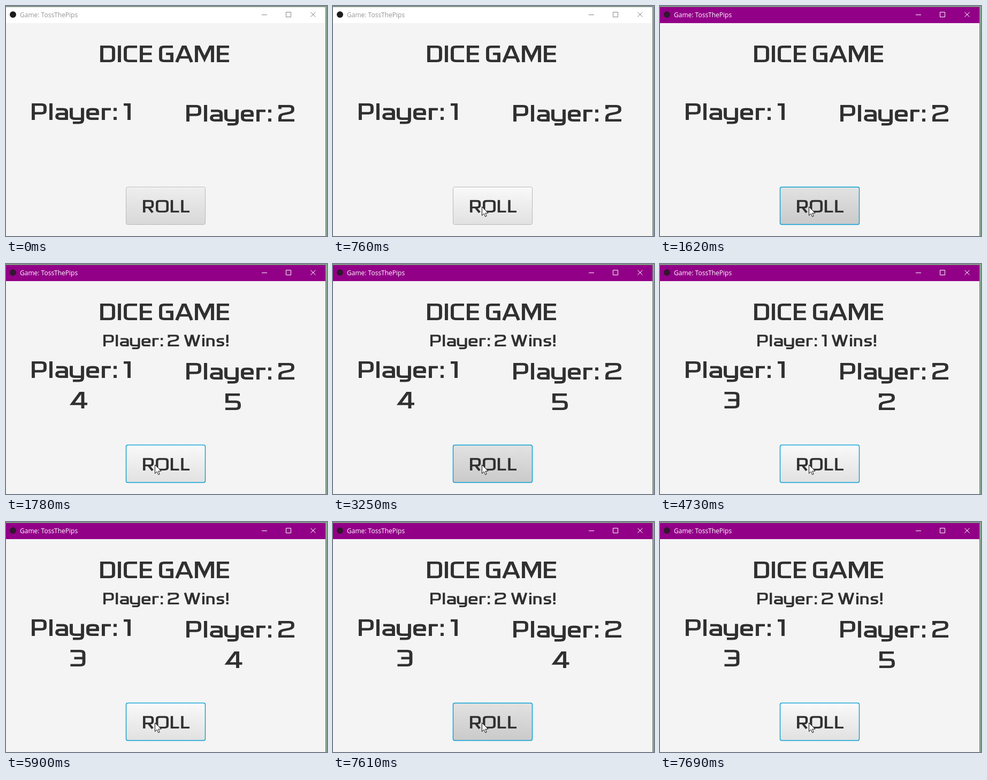
These frames come from a looping animation (600 px wide and 430 px high, 8 s). An HTML page:

```html
<!DOCTYPE html>
<html lang="en">
<head>
<meta charset="utf-8">
<title>Dice game</title>
<style>
html, body { margin: 0; width: 100%; height: 100%; overflow: hidden; background: #f4f4f4; }
svg { display: block; width: 600px; height: 430px; }
.letters path { fill: none; stroke: #303030; stroke-width: 4.5; }
.letters text { font: 34px "DejaVu Sans", sans-serif; fill: transparent; }
#title { font: 12px "Open Sans", sans-serif; }
</style>
</head>
<body>
<svg id="stage" viewBox="0 0 600 430">
  <defs>
    <linearGradient id="face" x1="0" y1="0" x2="0" y2="1">
      <stop id="faceTop" offset="0"/><stop id="faceEnd" offset="1"/>
    </linearGradient>
  </defs>
  <rect width="600" height="430" fill="#8aa892"/>
  <rect y="1" width="598" height="429" fill="#78857c"/>
  <rect y="2" width="597" height="428" fill="#f4f4f4"/>
  <rect id="bar" y="2" width="597" height="30"/>
  <circle id="icon" cx="13" cy="16" r="6"/>
  <text id="title" x="26" y="21">Game: TossThePips</text>
  <path id="controls" fill="none" d="M478 16.5h10M523.5 11.5h9v9h-9zM569.5 11.5l9 9m0 -9l-9 9"/>
  <rect x="224.5" y="338.5" width="148" height="70" rx="3" id="button" fill="url(#face)"/>
  <path id="shine" d="M227 339.8h143" stroke="#fff" stroke-opacity=".7"/>
  <g id="words"></g>
  <path id="cursor" d="M.5 .5V16.7L4.2 13.2 6.7 18.8 9.2 17.7 6.8 12.2H12z"
        fill="#fff" stroke="#111" stroke-width="1"/>
</svg>
<script>
const LOOP = 8000, GAP = 5, SPACE = 3, WIDEN = 1.3;
const $ = id => document.getElementById(id);

// Named heights above (-) or below (+) the baseline
const ROW = { T: -31, t: -28.75, q: -26.5, v: -23.5, X: -22.5, x: -20, f: -16.8, p: -17.5,
  m: -15.5, n: -12.5, h: -11.3, l: -9, k: -8.5, e: -6, g: -5.7, b: -2.25, z: 0, d: 5.2 };

// Glyph: width, then strokes of "x row" points; ~ rounds a corner, Z closes
const GLYPHS = {
  D: [28, '3t 25t~ 25b~ 3b Z'],
  I: [6, '3T 3z'],
  C: [25, '25t 3t~ 3b~ 25b'],
  E: [23, '23t 3t 3b 23b|3m 22m'],
  G: [27, '26t 3t~ 3b~ 24b 24m 13m'],
  A: [30, '1z 13t 17t 29z|6l 24l'],
  M: [36, '3z 3t 7t 18e 29t 33t 33z'],
  P: [28, '3z 3t 25t~ 25n~ 3n'],
  R: [27, '3z 3t 24t~ 24n~ 3n|14n 24z'],
  O: [32, '3t~ 29t~ 29b~ 3b~ Z'],
  L: [21, '3T 3b 21b'],
  W: [44, '3T 12b 14b 21t 23t 30b 32b 41T'],
  l: [6, '3T 3z'],
  a: [24, '2x 21x~ 21b 3b~ 3h~ 21h'],
  y: [24, '1X 1b~ 22b|22X 22d~ 4d'],
  e: [24, '3h 21h 21x~ 3x~ 3b~ 23b'],
  r: [17, '3z 3x 17x'],
  i: [6, '3X 3z|3T 3q'],
  n: [22, '3z 3x 19x~ 19z'],
  s: [21, '20x 3x~ 3h~ 18h~ 18b~ 1b'],
  ':': [6, '3X 3f|3g 3z'],
  '!': [6, '3T 3l|3g 3z'],
  1: [13, '0t 10t 10z'],
  2: [30, '3v 3t 27t~ 27p~ 3n~ 3b 30b'],
  3: [30, '1t 26t~ 26m 8m|26m 26b~ 1b'],
  4: [35, '35k 7k 22t 26.5t 26.5z'],
  5: [30, '28t 4t 4m 27m~ 27b~ 1b']
};

const show = p => p.map(n => n.toFixed(2)).join(' ');

function toward(p, q, max) {
  const dx = q[0] - p[0], dy = q[1] - p[1], len = Math.hypot(dx, dy);
  const k = Math.min(max, len / 2) / len;
  return [p[0] + dx * k, p[1] + dy * k];
}

function strokePath(spec, left) {
  const pts = [], rounded = [], closed = spec.endsWith('Z');
  for (const [, x, row, mark] of spec.matchAll(/([\d.]+)([a-zA-Y])(~?)/g)) {
    pts.push([(left + +x) / WIDEN, ROW[row]]);
    rounded.push(mark);
  }
  const n = pts.length;
  let d = 'M' + show(closed ? toward(pts[0], pts[1], 99) : pts[0]);
  for (let i = 1; i < (closed ? n + 1 : n); i++) {
    const p = pts[i % n], next = pts[(i + 1) % n];
    d += rounded[i % n]
      ? `L${show(toward(p, pts[i - 1], 5))}Q${show(p)} ${show(toward(p, next, 5))}`
      : 'L' + show(p);
  }
  return d + (closed ? 'Z' : '');
}

function lettering(text) {
  let x = 0, d = '';
  for (const c of text) {
    if (c === ' ') { x += SPACE + GAP; continue; }
    const [width, strokes] = GLYPHS[c];
    for (const s of strokes.split('|')) d += strokePath(s, x);
    x += width + GAP;
  }
  return { d, width: x - GAP };
}

// A line of lettering with a selectable text layer
function label(x, y, scale = 1, centered = false) {
  const make = (tag, parent) =>
    parent.appendChild(document.createElementNS('http://www.w3.org/2000/svg', tag));
  const g = make('g', $('words')), path = make('path', g), text = make('text', g);
  g.setAttribute('class', 'letters');
  path.setAttribute('transform', `scale(${WIDEN} 1)`);
  return value => {
    if (text.textContent === value) return;
    const { d, width } = lettering(value);
    const left = centered ? x - width / 2 : x;
    g.setAttribute('transform', `translate(${left} ${y}) scale(${scale})`);
    path.setAttribute('d', d);
    text.textContent = value;
  };
}

label(176, 105)('DICE GAME');
label(48, 213)('Player: 1');
label(337, 216)('Player: 2');
label(256, 386, 0.75)('ROLL');
const verdict = label(182, 154, 0.7);
const first = label(134.5, 270, 1, true);
const second = label(424, 273, 1, true);

const ROLLS = [
  { press: 1620, up: 1780, dice: [4, 5] },
  { press: 3250, up: 3400, dice: [5, 2] },
  { press: 4580, up: 4730, dice: [3, 2] },
  { press: 5820, up: 5900, dice: [3, 4] },
  { press: 7610, up: 7690, dice: [3, 5] }
];
const FACES = {
  idle: ['#eeeeee', '#d8d8d8'],
  hover: ['#f9f9f9', '#e1e1e1'],
  down: ['#e2e2e2', '#cacaca']
};
const MOVE = { start: 210, end: 760, steps: 8, from: [388, 412], to: [278, 375] };

function set(id, attrs) {
  for (const key in attrs) $(id).setAttribute(key, attrs[key]);
}

function pointer(t) {
  const { start, end, steps, from, to } = MOVE;
  const step = Math.floor((t - start) / (end - start) * (steps - 1) + 1e-6);
  const u = Math.min(1, step / (steps - 1));
  const k = 1 - (1 - u) ** 2;
  return from.map((v, i) => v + (to[i] - v) * k);
}

function render(t) {
  const active = t >= ROLLS[0].press;
  const down = ROLLS.some(r => t >= r.press && t < r.up);
  const roll = ROLLS.filter(r => t >= r.up).pop();
  const [x, y] = pointer(t);
  const hover = t >= MOVE.start && x < 373 && y < 409;

  set('bar', { fill: active ? '#930088' : '#ffffff' });
  set('icon', { fill: active ? '#31172f' : '#1c1c1c' });
  set('title', { fill: active ? '#ffffff' : '#949494' });
  set('controls', { stroke: active ? '#ffffff' : '#858585' });

  const [top, end] = FACES[down ? 'down' : hover ? 'hover' : 'idle'];
  set('faceTop', { 'stop-color': top });
  set('faceEnd', { 'stop-color': end });
  set('button', { stroke: active ? '#079fd3' : '#b8b8b8', 'stroke-width': active ? 1.4 : 1 });
  set('shine', { visibility: down ? 'hidden' : 'visible' });
  set('cursor', {
    transform: `translate(${x.toFixed(1)} ${y.toFixed(1)})`,
    visibility: t >= MOVE.start ? 'visible' : 'hidden'
  });

  const [a, b] = roll ? roll.dice : ['', ''];
  first(String(a));
  second(String(b));
  verdict(roll ? `Player: ${a > b ? 1 : 2} Wins!` : '');
}

const begin = performance.now();
function frame() {
  render((performance.now() - begin) % LOOP);
  requestAnimationFrame(frame);
}
frame();
</script>
</body>
</html>
```
